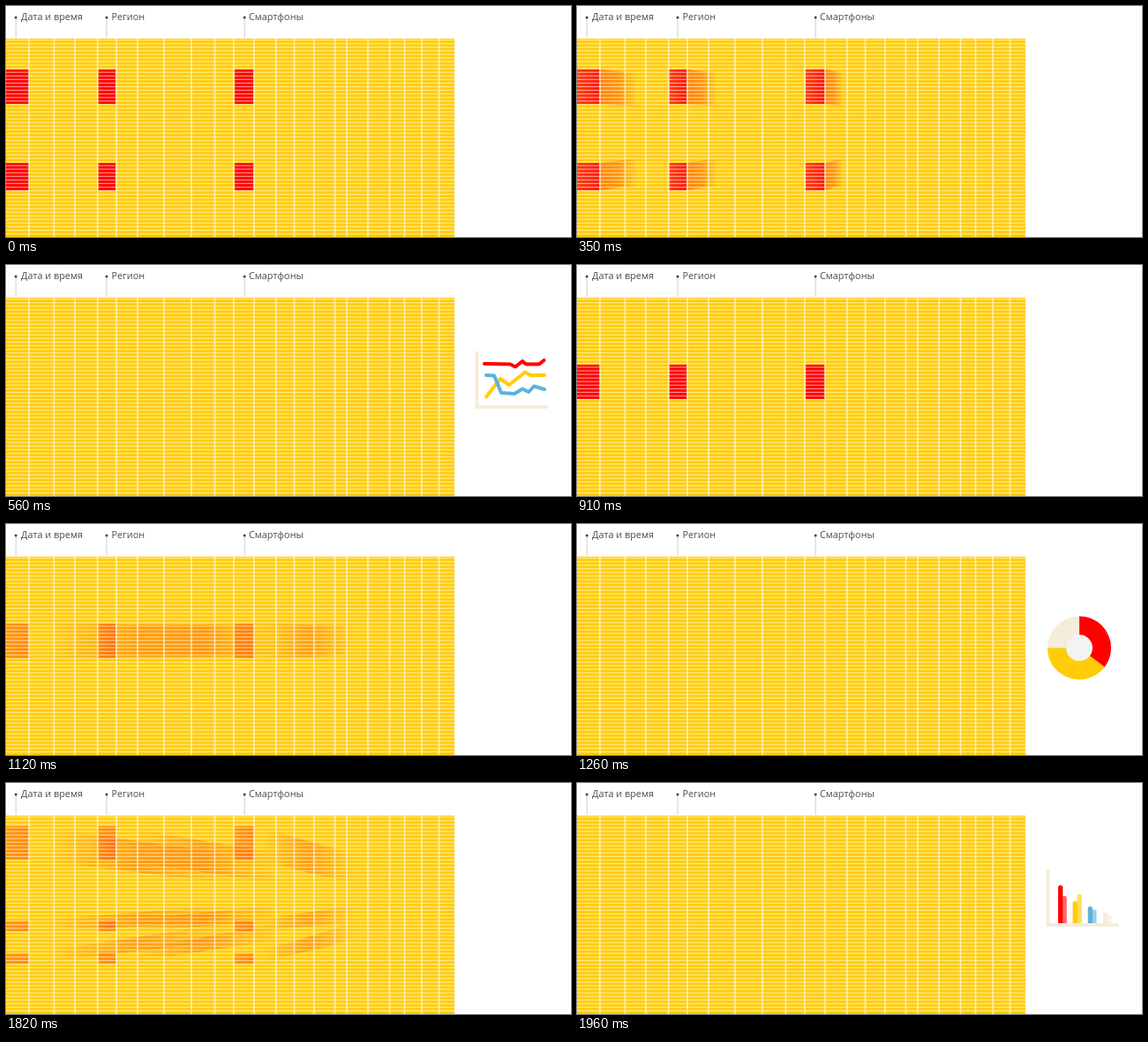
These frames come from a looping animation (640 px wide and 262 px high, 2240 ms). An HTML page with a canvas:

```html
<!DOCTYPE html>
<html lang="ru">
<head>
<meta charset="utf-8">
<style>
html, body { margin: 0; width: 640px; height: 262px; overflow: hidden; background: #fff; }
canvas, svg { position: absolute; left: 0; top: 0; display: block; }
text { font: 10.85px "Open Sans", "Noto Sans", sans-serif; fill: #4c4c4c; }
</style>
</head>
<body>
<canvas id="stage" width="640" height="262"></canvas>
<svg width="640" height="262">
  <text x="17" y="16">Дата и время</text>
  <text x="119.5" y="16">Регион</text>
  <text x="275" y="16">Смартфоны</text>
</svg>
<script>
const ctx = document.getElementById('stage').getContext('2d');
const RED = '#ff0000', YELLOW = '#ffcc0a', BLUE = '#5bb3d9', BEIGE = '#f5ecdc';
const LOOP = 2240, STEP = 70;
const TOP = 37, LINE0 = 38.6, PITCH = 4.07, RIGHT = 508;
const FOCUS = { x: 533, top: 118, bottom: 146 };
const dividers = [26, 54.5, 78, 103.7, 125, 149, 179, 210, 236.5, 258, 281,
  306, 326.5, 349, 372.5, 386, 410, 434.5, 451.5, 471, 490.5];
const columns = [[0, 26], [104.5, 124.5], [259, 280.5]];
const pins = [11.2, 114, 270.2];

// bands: top and bottom of the marked rows
const scenes = [
  { start: 0, fly: 350, show: 560, bands: [[72, 111], [178, 209]], icon: lineChart },
  { start: 910, fly: 1050, show: 1260, bands: [[113, 152]], icon: donut },
  { start: 1610, fly: 1750, show: 1960, bands: [[49, 87], [156, 168], [193, 205]], icon: barChart }
];

// head and tail are fractions of the way from a cell to the icon
const flight = [
  { cell: 0.95, head: 0.083, tail: 0, glow: 0.5, icon: 0 },
  { cell: 0.35, head: 0.45, tail: 0.04, glow: 0.4, icon: 0 },
  { cell: 0, head: 0.97, tail: 0.4, glow: 0.25, icon: 0.35 }
];

const mix = (a, b, k) => a + (b - a) * k;

function rect(color, x, y, w, h) {
  ctx.fillStyle = color;
  ctx.fillRect(x, y, w, h);
}

function polyline(color, points) {
  ctx.strokeStyle = color;
  ctx.lineWidth = 4;
  ctx.lineCap = ctx.lineJoin = 'round';
  ctx.beginPath();
  points.forEach(p => ctx.lineTo(p[0], p[1]));
  ctx.stroke();
}

function axes() {
  rect(BEIGE, 531.5, 98, 4, 65);
  rect(BEIGE, 531.5, 159, 82, 4);
}

function lineChart() {
  axes();
  polyline(YELLOW, [[544, 149.5], [560, 129], [570, 136], [588, 121.5], [594, 125], [610, 125]]);
  polyline(BLUE, [[544, 125], [553, 125.5], [561, 145], [576, 146], [585, 140.5], [592, 144], [598, 137.5], [610, 141]]);
  polyline(RED, [[542, 112], [571, 112.5], [577, 115.5], [585, 109], [589, 112.5], [604, 112.5], [609.5, 108]]);
}

function slice(color, r, from, to) {
  ctx.fillStyle = color;
  ctx.beginPath();
  ctx.moveTo(569, 140.5);
  ctx.arc(569, 140.5, r, from * Math.PI / 180, to * Math.PI / 180);
  ctx.fill();
}

function donut() {
  slice(BEIGE, 36, 180, 270);
  slice(YELLOW, 36, 37, 180);
  slice(RED, 36, -90, 37);
  slice('#f3f3f1', 15, 0, 360);
}

function bar(color, x, y) {
  ctx.fillStyle = color;
  ctx.beginPath();
  ctx.roundRect(x, y, 5.3, 159 - y, [2.5, 2.5, 0, 0]);
  ctx.fill();
}

function barChart() {
  axes();
  bar('#ff6b6b', 549.5, 128);
  bar(RED, 545, 116);
  bar('#ffdf5c', 566.5, 126);
  bar(YELLOW, 561.5, 134);
  bar('#9ad0e8', 583.2, 143.5);
  bar(BLUE, 578.7, 140);
  bar('#f9f3e9', 600.8, 150);
  bar(BEIGE, 596, 147);
}

// horizontal gradient from [offset, alpha] stops
function fade(rgb, x0, x1, stops) {
  const g = ctx.createLinearGradient(x0, 0, x1, 0);
  for (const [at, alpha] of stops) g.addColorStop(at, `rgba(${rgb},${alpha})`);
  return g;
}

function streak(right, y0, y1, f) {
  const x0 = mix(right, FOCUS.x, f.tail), x1 = mix(right, FOCUS.x, f.head);
  ctx.fillStyle = fade('255,60,0', x0, x1, [[0, f.tail ? 0 : f.glow], [0.5, f.glow * 0.8], [1, 0]]);
  ctx.beginPath();
  ctx.moveTo(x0, mix(y0, FOCUS.top, f.tail));
  ctx.lineTo(x1, mix(y0, FOCUS.top, f.head));
  ctx.lineTo(x1, mix(y1, FOCUS.bottom, f.head));
  ctx.lineTo(x0, mix(y1, FOCUS.bottom, f.tail));
  ctx.fill();
}

function cells(scene, f) {
  for (const [y0, y1] of scene.bands) {
    for (const [left, right] of columns) {
      const color = f ? fade('255,10,10', left, right, [[0, f.cell * 0.78], [1, f.cell]]) : RED;
      rect(color, left, y0, right - left, y1 - y0);
      if (f) streak(right, y0, y1, f);
    }
  }
}

function gridLines() {
  for (let y = LINE0; y < 262; y += PITCH) rect('rgba(255,255,255,.55)', 0, y - 0.6, RIGHT, 1.2);
  for (const x of dividers) rect('rgba(255,246,214,.75)', x - 0.85, TOP, 1.7, 225);
}

function draw(t) {
  const scene = scenes.findLast(s => t >= s.start);
  const flying = t >= scene.fly && t < scene.show;
  const f = flying ? flight[Math.min(2, Math.floor((t - scene.fly) / STEP))] : null;

  rect('#fff', 0, 0, 640, 262);
  for (const x of pins) {
    rect('#cfcfcf', x - 0.5, 14, 1, 22);
    ctx.fillStyle = '#444';
    ctx.beginPath();
    ctx.arc(x, 13, 1.5, 0, 7);
    ctx.fill();
  }
  rect(YELLOW, 0, TOP, RIGHT, 225);
  if (t < scene.show) cells(scene, f);
  gridLines();

  ctx.globalAlpha = t >= scene.show ? 1 : f ? f.icon : 0;
  if (ctx.globalAlpha) scene.icon();
  ctx.globalAlpha = 1;
}

const begin = performance.now();
function tick() {
  draw((performance.now() - begin) % LOOP);
  requestAnimationFrame(tick);
}
tick();
</script>
</body>
</html>
```
